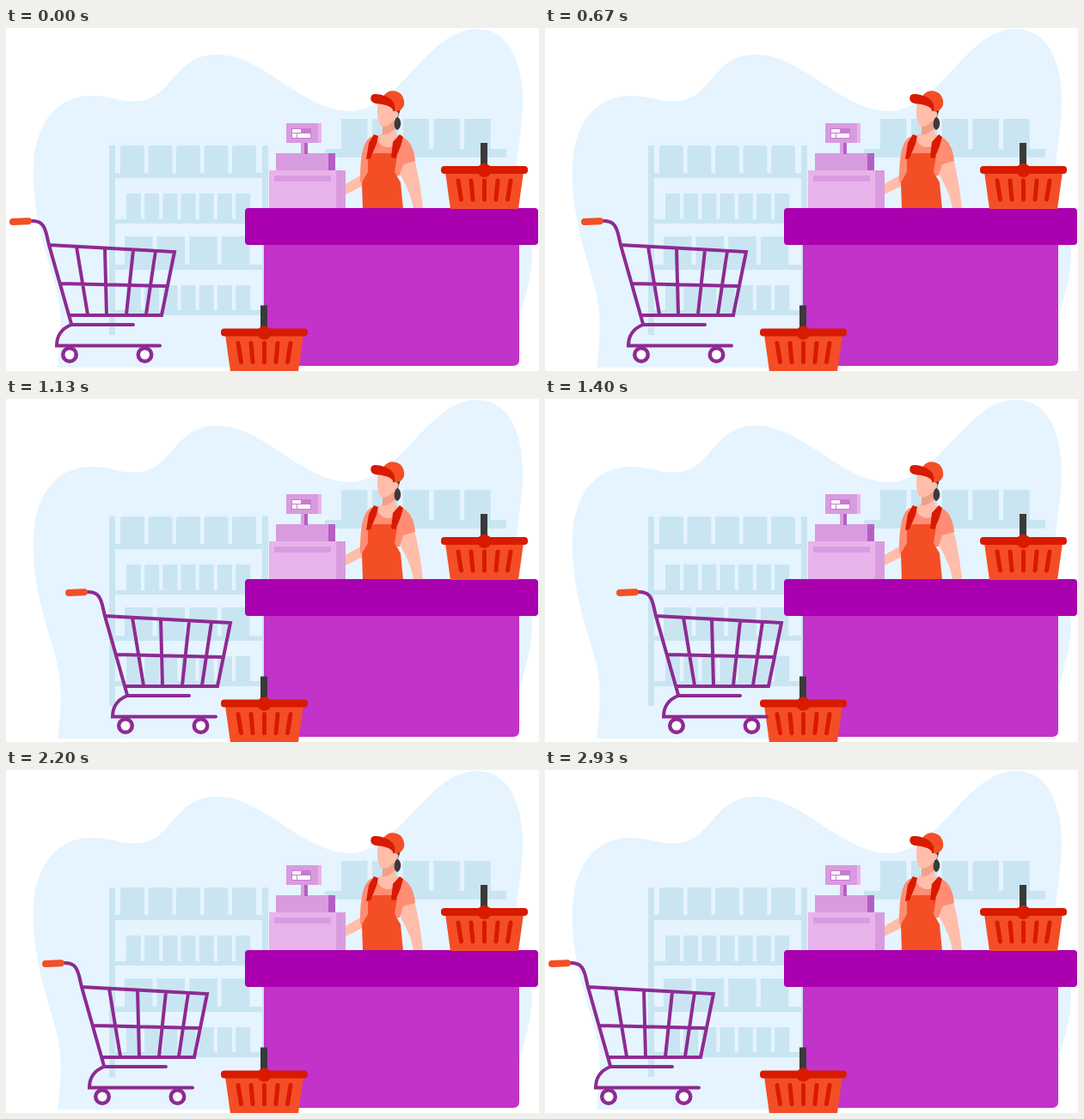
An HTML page for the animation above (3.07 s loop, 620x400 px).

```html
<!DOCTYPE html>
<html lang="en">
<head>
<meta charset="utf-8">
<title>Checkout</title>
<style>
  html, body { margin: 0; width: 100%; height: 100%; overflow: hidden; background: #fff; }
  svg { display: block; }
</style>
</head>
<body>
<svg width="620" height="400" viewBox="0 0 620 400">
  <path fill="#e5f4ff" d="M60 396C68 330 62 315 50 275C38 235 30 195 32 160C34 115 55 82 95 79C125 78 140 91 165 83C195 73 200 31 245 31C300 31 345 98 402 97C460 94 490 1 548 1C585 1 601 40 601 85C601 125 590 165 592 200C594 225 613 235 612 265C611 300 600 320 597 345L330 396Z"/>

  <g id="shelves" fill="#c9e5f2">
    <path d="M120 137h7v221h-7zM298 137h7v198h-7zM120 169h185v6H120zM120 223h185v5H120zM120 276h185v6H120zM120 329h185v6H120zM371 141h211v10H371z"/>
  </g>

  <!-- cash register -->
  <path fill="#d99be0" d="M326 111h41v23h-41zM343 134h8v13h-8zM314 146h69v21h-69z"/>
  <path fill="#b55fc4" d="M347 134h4v13h-4zM375 146h8v21h-8z"/>
  <path fill="#e9b3eb" d="M306 166h89v45h-89z"/>
  <path fill="#d99be0" d="M384 166h11v45h-11zM312 172h66v7h-66z"/>
  <path fill="#e9b3eb" d="M363 111h4v23h-4z"/>
  <path fill="#c77bd0" d="M332 117h23v12h-23z"/>
  <path fill="#fff" d="M333 118h10v4h-10zM333 123h5v5h-5zM339 123h15v5h-15z"/>

  <!-- cashier -->
  <path fill="#ffbdaa" d="M395 182L414 171L419 182L395 194ZM460 156L475 153C480 172 483 190 485 211H474C472 196 465 182 459 172Z"/>
  <path fill="#ff8c73" d="M434 125L424 127C415 133 412 150 412 180L420 178L458 172L462 159L476 155C475 142 470 132 463 128L452 124Z"/>
  <path fill="#ffbdaa" d="M438 108H453V124L458 127C454 143 435 143 431 127L438 122Z"/>
  <path fill="#f0a08a" d="M438 114L453 107V116C449 121 444 125 438 124Z"/>
  <path fill="#3a3a3a" d="M448 90L459 94L456 104C461 108 460 117 455 119C451 117 451 111 453 106Z"/>
  <path fill="#ffbdaa" d="M433 87C431 98 432 106 435 113C440 117 448 113 452 106C457 105 458 98 454 97L450 97L448 85Z"/>
  <path fill="#f44e26" d="M428 146H452L455 149L452 168L459 180L462 211H415L414 180L421 168V151Z"/>
  <path fill="#d81a00" d="M428 124L433 126L431 135L424 152L419 153L422 134ZM458 124L462 127L459 138L453 152L448 151L450 133Z"/>
  <path fill="#f44e26" d="M438 81C442 74 448 72 454 74C461 76 464 83 463 90C461 95 457 98 452 97Z"/>
  <path fill="#d81a00" d="M425 79C427 76 434 77 440 79C449 82 454 88 452 97C447 90 439 89 430 88C425 87 423 83 425 79Z"/>

  <!-- counter -->
  <path fill="#c233c9" d="M300 250H597V387Q597 394 590 394H300Z"/>
  <rect x="278" y="210" width="341" height="43" rx="4" fill="#aa00b0"/>

  <g id="basket">
    <path fill="#f44e26" d="M511 168H602L596 211H517Z"/>
    <path stroke="#d81a00" stroke-width="5" stroke-linecap="round" d="M526 178L529.5 200M541 178L543 200M556.5 178V200M572 178L570 200M587 178L583.5 200"/>
    <path fill="#3a3a3a" d="M552 134h8v27h-8z"/>
    <rect x="506" y="161" width="101" height="9" rx="4" fill="#d81a00"/>
    <circle cx="556.5" cy="166" r="8" fill="#d81a00"/>
  </g>
  <use href="#basket" x="-256" y="189.5"/>

  <g id="cart" fill="none" stroke="#8e2a92" stroke-width="4" stroke-linecap="round">
    <path d="M28 225C40 224 44 229 47 240L50 253L76 345M50 253L196 261L181 335H74M64 298L187 301M82 255L95 334M115 257L117 334M148 259L140 334M174 260L163 334M148 346H76C66 350 59 358 59 370.5H179"/>
    <g fill="#fff" stroke-width="4.5">
      <circle cx="74" cy="381" r="7.75"/>
      <circle cx="161.5" cy="381" r="7.75"/>
    </g>
    <path stroke="#f44e26" stroke-width="8" d="M8 226L26 225.2"/>
  </g>
</svg>
<script>
  const shelves = document.getElementById('shelves');
  const cart = document.getElementById('cart');
  const LOOP = 3070, STEP = 200 / 3, STEPS = 46;

  // A row of equal boxes standing on a shelf
  function addRow(count, x, y, width, height, pitch, radius = 0) {
    for (let i = 0; i < count; i++) {
      const box = document.createElementNS('http://www.w3.org/2000/svg', 'rect');
      const attrs = { x: x + i * pitch, y, width, height, rx: radius };
      for (const key in attrs) box.setAttribute(key, attrs[key]);
      shelves.append(box);
    }
  }
  addRow(5, 133, 137, 28, 34, 32.5, 3);
  addRow(7, 140, 193, 17, 30, 21.2);
  addRow(4, 138, 243, 32.5, 33, 37.6);
  addRow(7, 140, 300, 17, 29, 21.2);
  addRow(5, 390, 106, 30.5, 35, 35.8);

  // The cart rolls right, rests for one step, then rolls back
  function cartOffset(step) {
    return Math.round(Math.max(0, Math.min(3.82 * step, 78.6, 71.3 - 3.65 * (step - 24))));
  }

  function draw() {
    const time = performance.now() % LOOP;
    const step = Math.min(STEPS - 1, Math.floor((time + 5) / STEP));
    cart.setAttribute('transform', `translate(${cartOffset(step)} 0)`);
    requestAnimationFrame(draw);
  }
  draw();
</script>
</body>
</html>
```
